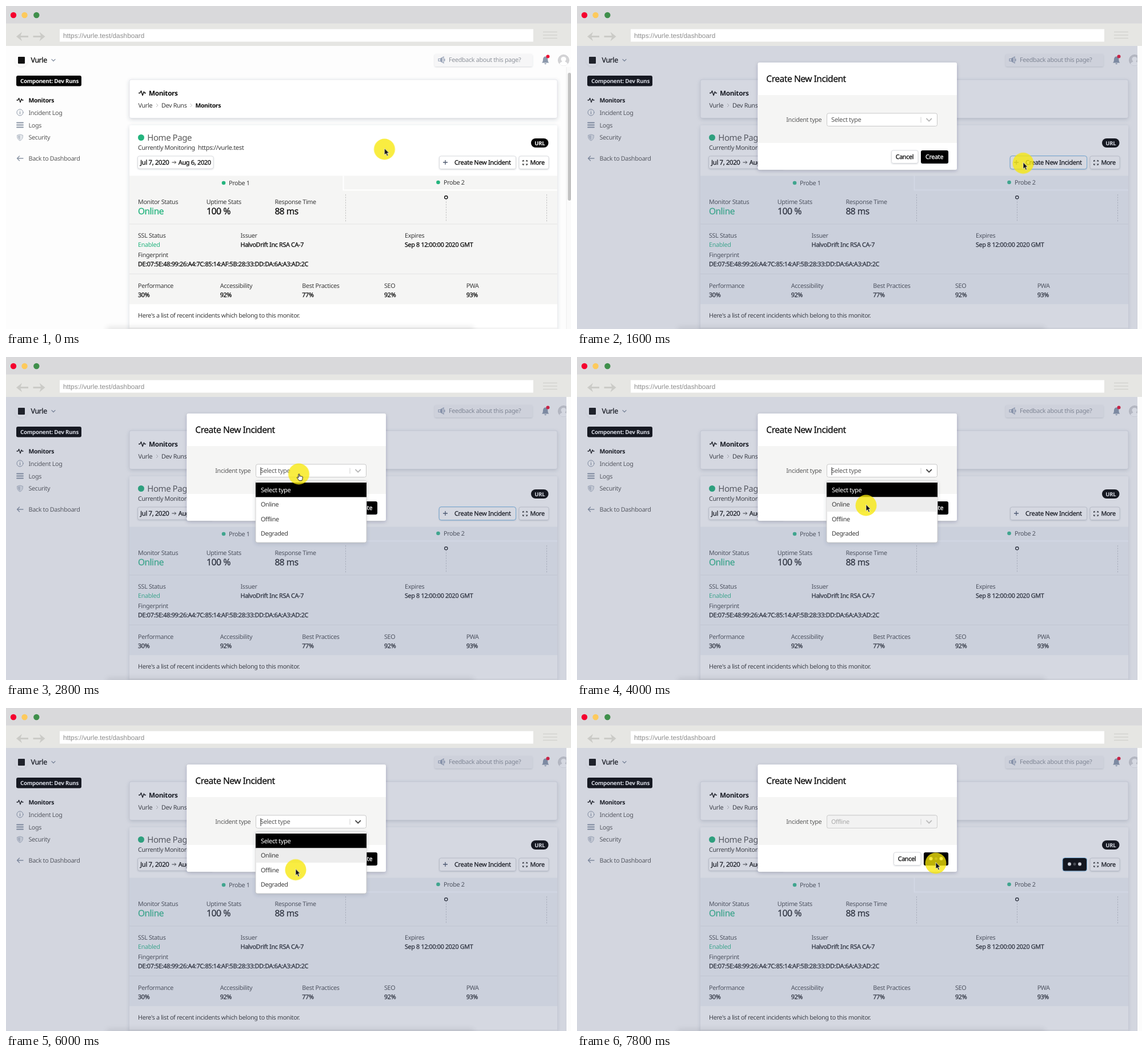
These frames come from a looping animation (989x566 px, 8000 ms). An HTML page:

```html
<!DOCTYPE html>
<html lang="en">
<head>
<meta charset="utf-8">
<title>Create incident</title>
<style>
html, body { margin: 0; width: 100%; height: 100%; overflow: hidden; background: #fff; }
svg { display: block; width: 100%; height: 100%; }
text {
  font: 400 10.75px "Noto Sans", sans-serif;
  letter-spacing: -.03em;
  text-rendering: geometricPrecision;
  color: #3a3a3a;
  fill: currentColor;
  white-space: pre;
}
.url { font: 11.8px "Liberation Sans", Arial, sans-serif; letter-spacing: 0; color: #8d8d8d; }
.m { font-weight: 500; color: #0c0c0c; stroke: currentColor; stroke-width: .28; }
.b { font-weight: 600; font-size: 10.4px; color: #0a0a0a; }
.big { font-size: 15.4px; }
.side { color: #5a5a5a; }
.green { color: #24b47e; fill: currentColor; }
.white { color: #fff; }
.grey { color: #8f949c; }
.line { fill: none; stroke: #8a95a5; stroke-width: 1.3; stroke-linecap: round; stroke-linejoin: round; }
.btn { fill: #fff; stroke: #d9dade; filter: url(#low); }
.ring { fill: none; stroke: #86c4ee; }

.t { animation: 8s step-end infinite; }
.hover { animation-name: hover; }
.modal { animation-name: modal; }
.focus { animation-name: focus; }
.menu { animation-name: menu; }
.row { animation-name: row; }
.caret { animation-name: caret; }
.chev { animation-name: chev; }
.empty { animation-name: empty; }
.chosen { animation-name: chosen; }
.idle { animation-name: idle; }
.busy { animation-name: busy; }
.hand { animation-name: hand; }
.arrow { animation-name: arrow; }
.pointer { animation-name: move; }
.dots circle { fill: #fff; animation: pulse .8s -.2s ease-in-out infinite; }
.dots circle:nth-child(2) { animation-delay: -.6s; }

@keyframes hover { 0% { color: #0c0c0c } 10% { color: #3c3c3c } 20%, to { color: #0c0c0c } }
@keyframes modal { 0% { opacity: 0 } 20%, to { opacity: 1 } }
@keyframes focus { 0% { opacity: 0 } 20% { opacity: 1 } 37.5%, to { opacity: 0 } }
@keyframes menu { 0% { opacity: 0 } 35% { opacity: 1 } 80%, to { opacity: 0 } }
@keyframes row { 0% { opacity: 0 } 37.5%, to { opacity: 1 } }
@keyframes caret {
  0%, 42.5%, 55%, 70%, 80%, to { opacity: 0 }
  35%, 50%, 62.5%, 75% { opacity: 1 }
}
@keyframes chev { 0% { stroke: #b9b9b9 } 37.5% { stroke: #4a4a4a } 95%, to { stroke: #bdbdbd } }
@keyframes empty { 0% { opacity: 1 } 80%, to { opacity: 0 } }
@keyframes chosen { 0% { opacity: 0 } 80% { opacity: 1; color: #555 } 90%, to { opacity: 1; color: #a8a8a8 } }
@keyframes idle { 0% { opacity: 1 } 90%, to { opacity: 0 } }
@keyframes busy { 0% { opacity: 0 } 90%, to { opacity: 1 } }
@keyframes hand { 0%, 40%, 90%, to { opacity: 0 } 32.5%, 85% { opacity: 1 } }
@keyframes arrow { 0%, 40%, 90%, to { opacity: 1 } 32.5%, 85% { opacity: 0 } }
@keyframes pulse { 0%, to { opacity: 1 } 50% { opacity: .3 } }
@keyframes move {
  0% { transform: translate(662.5px, 251px) }
  2.5% { transform: translate(672px, 253px) }
  5% { transform: translate(698px, 258px) }
  7.5% { transform: translate(737px, 266px) }
  10% { transform: translate(770px, 273px) }
  12.5% { transform: translate(781px, 275.5px) }
  25% { transform: translate(749px, 267px) }
  27.5% { transform: translate(646px, 240px) }
  30% { transform: translate(547px, 214px) }
  32.5% { transform: translate(512.5px, 205px) }
  40% { transform: translate(510px, 230px) }
  42.5% { transform: translate(506px, 260px) }
  67.5% { transform: translate(506px, 262px) }
  70% { transform: translate(506px, 270px) }
  72.5% { transform: translate(507px, 279px) }
  75% { transform: translate(507px, 283.5px) }
  80% { transform: translate(516px, 283px) }
  82.5% { transform: translate(586px, 276px) }
  85%, to { transform: translate(628px, 272px) }
}
</style>
</head>
<body>
<svg viewBox="0 0 989 566" preserveAspectRatio="none">
  <defs>
    <filter id="low" x="-10%" y="-20%" width="120%" height="150%">
      <feDropShadow dx="0" dy="1" stdDeviation="1" flood-color="#3c4257" flood-opacity=".2"/>
    </filter>
    <filter id="card" x="-5%" y="-20%" width="110%" height="150%">
      <feDropShadow dx="0" dy="2" stdDeviation="3" flood-color="#3c4257" flood-opacity=".2"/>
    </filter>
    <filter id="high" x="-10%" y="-10%" width="120%" height="130%">
      <feDropShadow dx="0" dy="2" stdDeviation="3" flood-color="#1e2540" flood-opacity=".22"/>
    </filter>
    <filter id="soft" x="-5%" y="-200%" width="110%" height="500%"><feGaussianBlur stdDeviation="5"/></filter>
    <clipPath id="view"><rect y="70" width="989" height="496"/></clipPath>
    <path id="beat" d="M0 0h2.6l1.9-3.8 2.6 8 2.3-6.6 1.2 2.4H13" fill="none" stroke="#111" stroke-width="1.4" stroke-linejoin="round"/>
    <path id="sep" d="M0-3l3 3-3 3" fill="none" stroke="#bbb"/>
  </defs>

  <g clip-path="url(#view)">
    <rect y="70" width="989" height="496" fill="#fdfdfd"/>

    <!-- header -->
    <circle cx="27" cy="95" r="11" fill="#fff" filter="url(#low)" opacity=".6"/>
    <rect x="21" y="89" width="12" height="12" rx="1" fill="#111"/>
    <text class="m" x="43.5" y="98.5" style="font-size:12.3px">Vurle</text>
    <path class="line" d="M80 93.5l3 3 3-3" stroke-width="1"/>
    <rect x="750" y="84" width="171.5" height="22" rx="3" fill="#f6f6f7" filter="url(#low)"/>
    <path d="M757 92.5h3l6-3.5v11l-6-3.5h-3z" fill="none" stroke="#9aa5b8" stroke-width="1.2"/>
    <path d="M760 92.5l4-2v8l-4-2zM767 92.5h1.5v4H767z" fill="#9aa5b8"/>
    <text class="grey" x="775" y="98">Feedback about this page?</text>
    <path d="M938 99.5c2-2 1.8-3.5 2-6 .2-3 1.5-5 4.2-5s4 2 4.2 5c.2 2.5 0 4 2 6zM942.5 100.5h3.4c0 2.2-3.4 2.2-3.4 0z" fill="#8c99ac"/>
    <circle cx="948.5" cy="88.5" r="3" fill="#ee1133"/>
    <circle cx="976" cy="95" r="9.5" fill="#d4d4d6" stroke="#c4c4c8" stroke-width=".8"/>
    <path d="M969 101.5c1-3.5 4-3 4.5-4.5-3.5-3-2.5-8 2.5-8s6 5 2.5 8c.5 1.5 3.5 1 4.5 4.5a9.3 9.3 0 0 1-14 0z" fill="#fff"/>

    <!-- sidebar -->
    <rect x="18" y="122" width="114" height="18.5" rx="3" fill="#050505"/>
    <text class="b white" x="25" y="135" style="font-size:9.8px">Component: Dev Runs</text>
    <use href="#beat" transform="translate(18.5 165) scale(.92)"/>
    <g class="line">
      <circle cx="24.5" cy="186.5" r="5.5" stroke-width="1"/>
      <path d="M24.5 186v3M24.5 183.8v.1"/>
      <path d="M19 204.5h11M19 208.5h11M19 212.5h11" stroke-width="1.8"/>
      <path d="M30 267H19.5l4-4m-4 4l4 4"/>
    </g>
    <path d="M19.5 226.5l5-1.5 5 1.5c0 5-1 7.5-5 9.5-4-2-5-4.5-5-9.5z" fill="#e6e9ed" stroke="#b0b8c4"/>
    <path d="M24.5 226.5v8c-2.5-1.5-3.5-3.5-3.5-7z" fill="#bcc3cd"/>
    <text class="b" x="39.5" y="169">Monitors</text>
    <text class="side" x="39.5" y="190.8">Incident Log</text>
    <text class="side" x="39.5" y="212.8">Logs</text>
    <text class="side" x="39.5" y="234.3">Security</text>
    <text class="side" x="39.5" y="271">Back to Dashboard</text>

    <!-- breadcrumb card -->
    <rect x="216" y="129" width="749" height="67.5" rx="3" fill="#fff" stroke="#dfe0e6" stroke-width=".8" filter="url(#card)"/>
    <use href="#beat" x="232" y="152.5"/>
    <text class="b" x="250" y="156.7" style="font-size:11.8px">Monitors</text>
    <text x="231.5" y="178">Vurle</text>
    <use href="#sep" x="263" y="174"/>
    <text x="272" y="178">Dev Runs</text>
    <use href="#sep" x="322.5" y="174"/>
    <text class="b" x="331.5" y="178">Monitors</text>

    <!-- monitor card -->
    <rect x="216" y="209" width="749" height="380" rx="3" fill="#fff" filter="url(#card)"/>
    <circle class="green" cx="236.5" cy="230.5" r="5.5"/>
    <text class="side" x="247.3" y="235.7" style="font-size:15px">Home Page</text>
    <text x="231" y="252">Currently Monitoring</text>
    <text x="336" y="252" style="font-size:11px">https://vurle.test</text>
    <rect class="btn" x="230.5" y="263" width="132.5" height="22" rx="3"/>
    <text class="m" x="235" y="277.7" style="font-size:11.3px">Jul 7, 2020</text>
    <path d="M290.5 274h7m-2.5-2.5l2.5 2.5-2.5 2.5" fill="none" stroke="#333"/>
    <text class="m" x="301.7" y="277.7" style="font-size:11px">Aug 6, 2020</text>
    <rect x="919" y="232" width="30.5" height="16" rx="8" fill="#050505"/>
    <text class="b white" x="925.3" y="243.6" style="font-size:9.5px">URL</text>

    <g class="t idle">
      <rect class="btn" x="758.5" y="263" width="134" height="22.5" rx="3"/>
      <path d="M765 274h8M769 270v8" stroke="#4f5b70" stroke-width="1.3"/>
      <text class="m t hover" x="785" y="278" style="font-size:11px">Create New Incident</text>
      <rect class="ring t focus" x="758" y="262.5" width="134.5" height="23.5" rx="4"/>
    </g>
    <g class="t busy">
      <rect x="850" y="263" width="42.5" height="22.5" rx="3"/>
      <rect class="ring" x="850" y="262.5" width="42.5" height="23.5" rx="4"/>
      <g class="dots" transform="translate(871 273.5)"><circle cx="-9" r="3"/><circle r="2.5"/><circle cx="9" r="3"/></g>
    </g>
    <rect class="btn" x="898" y="263" width="52" height="22.5" rx="3"/>
    <path d="M904.5 273v-2.5h2.5M910 270.5h2.5v2.5M912.5 276v2.5H910M907 278.5h-2.5V276M905 271l2 2M912 271l-2 2M905 278l2-2M912 278l-2-2" fill="none" stroke="#444"/>
    <text class="m" x="917.5" y="278">More</text>

    <!-- probe panel -->
    <rect x="216" y="297.5" width="749" height="225" fill="#f5f5f4"/>
    <path d="M590.5 297.5v25H965" fill="none" stroke="#fff" stroke-width="2"/>
    <circle class="green" cx="381" cy="310" r="3.3"/>
    <text x="390" y="314">Probe 1</text>
    <circle class="green" cx="756.5" cy="309" r="3.3"/>
    <text x="766" y="313">Probe 2</text>
    <text x="231" y="347">Monitor Status</text>
    <text x="350.8" y="347">Uptime Stats</text>
    <text x="470.5" y="347">Response Time</text>
    <text class="m big green" x="231" y="364.8">Online</text>
    <text class="m big" x="351" y="364.8" style="font-size:15.8px">100 %</text>
    <text class="m big" x="470.5" y="364.8">88 ms</text>
    <path d="M594.5 330v48M770.5 338v40M946.5 330v48" stroke="#c2c2c2" stroke-dasharray="2.5 2"/>
    <circle cx="770.3" cy="335.3" r="2.6" fill="#fff" stroke="#111" stroke-width="1.4"/>
    <path d="M216 382h749M216 469.5h749" stroke="#e4e4e4"/>

    <text x="231" y="406">SSL Status</text>
    <text x="410.5" y="406">Issuer</text>
    <text x="698" y="406">Expires</text>
    <text class="green" x="231" y="421.7">Enabled</text>
    <text class="m" x="410.5" y="421.7">HalvoDrift Inc RSA CA-7</text>
    <text class="m" x="698" y="421.7">Sep 8 12:00:00 2020 GMT</text>
    <text x="231" y="440">Fingerprint</text>
    <text class="m" x="231" y="455.7" style="font-size:10.85px">DE:07:5E:48:99:26:A4:7C:85:14:AF:5B:28:33:DD:DA:6A:A3:AD:2C</text>

    <text x="231" y="493.7">Performance</text>
    <text x="374.7" y="493.7">Accessibility</text>
    <text x="518.3" y="493.7">Best Practices</text>
    <text x="662" y="493.7">SEO</text>
    <text x="805.7" y="493.7">PWA</text>
    <text class="m" x="231" y="509.5">30%</text>
    <text class="m" x="374.7" y="509.5">92%</text>
    <text class="m" x="518.3" y="509.5">77%</text>
    <text class="m" x="662" y="509.5">92%</text>
    <text class="m" x="805.7" y="509.5">93%</text>
    <text x="231" y="546">Here's a list of recent incidents which belong to this monitor.</text>
    <path d="M216 564.5h749" stroke="#e6e6e6"/>
    <rect x="175" y="562" width="645" height="12" rx="6" opacity=".09" filter="url(#soft)"/>

    <!-- scrollbar -->
    <path d="M981 107h8v459h-8z" fill="#fafafa"/>
    <path d="M981 107v459" stroke="#ececec"/>
    <rect x="983.5" y="117" width="5.5" height="224" rx="2.7" fill="#c2c2c2"/>

    <g class="t modal">
      <rect y="70" width="981" height="496" fill="#515c82" opacity=".24"/>
      <rect x="216" y="297.5" width="749" height="225" fill="#b8d0ff" opacity=".12"/>
      <rect x="981" y="70" width="8" height="496" fill="#fcfcfc"/>

      <rect x="316.5" y="99" width="348.5" height="188" rx="3" fill="#fff" filter="url(#high)"/>
      <rect x="316.5" y="156" width="348.5" height="84" fill="#f5f5f4"/>
      <text class="m" x="331.3" y="133.3" style="font-size:15.55px">Create New Incident</text>
      <text class="side" x="366.3" y="202.5">Incident type</text>

      <rect x="437.5" y="188" width="193" height="22.5" rx="3" fill="#fff" stroke="#c9c9c9"/>
      <rect class="t busy" x="437.5" y="188" width="193" height="22.5" rx="3" fill="#f2f2f2" stroke="#cfcfcf"/>
      <path d="M602 194.5v10" stroke="#d2d2d2"/>
      <path class="t chev" d="M612 197.5l4.2 4.2 4.2-4.2" fill="none" stroke-width="1.8" stroke-linecap="round"/>
      <text class="side t empty" x="445" y="202.7" style="font-size:11px">Select type</text>
      <text class="t chosen" x="445" y="202.7">Offline</text>
      <path class="t caret" d="M446 193v14" stroke="#333"/>

      <g class="t idle">
        <rect class="btn" x="550.5" y="253" width="46.5" height="22.5" rx="3"/>
        <text class="m" x="557.7" y="268.2">Cancel</text>
        <rect x="602" y="253" width="48" height="23" rx="3" filter="url(#low)"/>
        <text class="m white" x="610" y="268.2">Create</text>
      </g>
      <g class="t busy">
        <rect class="btn" x="554.5" y="253" width="47.5" height="22.5" rx="3"/>
        <text class="m" x="561.7" y="268.2">Cancel</text>
        <rect x="607" y="253" width="43" height="23" rx="3" filter="url(#low)"/>
        <g class="dots" transform="translate(628.5 264)"><circle cx="-9" r="3"/><circle r="2.5"/><circle cx="9" r="3"/></g>
      </g>

      <g class="t menu">
        <rect x="437" y="217" width="194" height="108" rx="3" fill="#fff" stroke="#c8c8c8" stroke-width=".8" filter="url(#card)"/>
        <rect x="437" y="220" width="194" height="25.5"/>
        <rect class="t row" x="437.5" y="245.5" width="193" height="25.5" fill="#ededed"/>
        <text class="white" x="446" y="236.5" style="font-size:11px">Select type</text>
        <text x="446" y="262">Online</text>
        <text x="446" y="287.7">Offline</text>
        <text x="446" y="313.3">Degraded</text>
      </g>
    </g>
  </g>

  <!-- browser frame -->
  <rect width="989" height="31" fill="#d9d9db"/>
  <rect y="30.5" width="989" height="39.5" fill="#e6e6e3"/>
  <circle cx="13" cy="16" r="5.2" fill="#f5002f"/>
  <circle cx="32.5" cy="16" r="5.2" fill="#fdca5c"/>
  <circle cx="53.3" cy="16" r="5.2" fill="#3f8f4b"/>
  <g fill="#cbcbc7">
    <path id="back" d="M18 53.5l10-8-2.5 6.5H39v3H25.500l2.500 6.500z"/>
    <use href="#back" transform="matrix(-1 0 0 1 86.5 0)"/>
  </g>
  <rect x="94" y="40.5" width="829" height="22" fill="#fff"/>
  <text class="url" x="100" y="55.8">https://vurle.test/dashboard</text>
  <path d="M940 45.5h25M940 51h25M940 56.5h25" stroke="#d3d3cf" stroke-width="1.4"/>

  <g class="t pointer">
    <circle r="18.5" fill="#f8e808" opacity=".77"/>
    <path class="t arrow" d="M0-1.5v11.5l2.6-2.4 1.9 4.3 2-.9-1.9-4.2h3.5z" fill="#111" stroke="#fff" stroke-width=".7"/>
    <path class="t hand" d="M-.6 1c0-1.5 2-1.5 2 0v3.3c.3-1 1.8-.9 1.9 0 .4-.8 1.7-.6 1.8.3.5-.6 1.6-.3 1.6.7 0 3-.3 4.2-1.4 6.4H.6C-.6 9.9-1.6 8.7-2.7 7c-.9-1.4.5-2.2 1.4-1.3l.7.8z" fill="#fff" stroke="#111"/>
  </g>
</svg>
</body>
</html>
```
